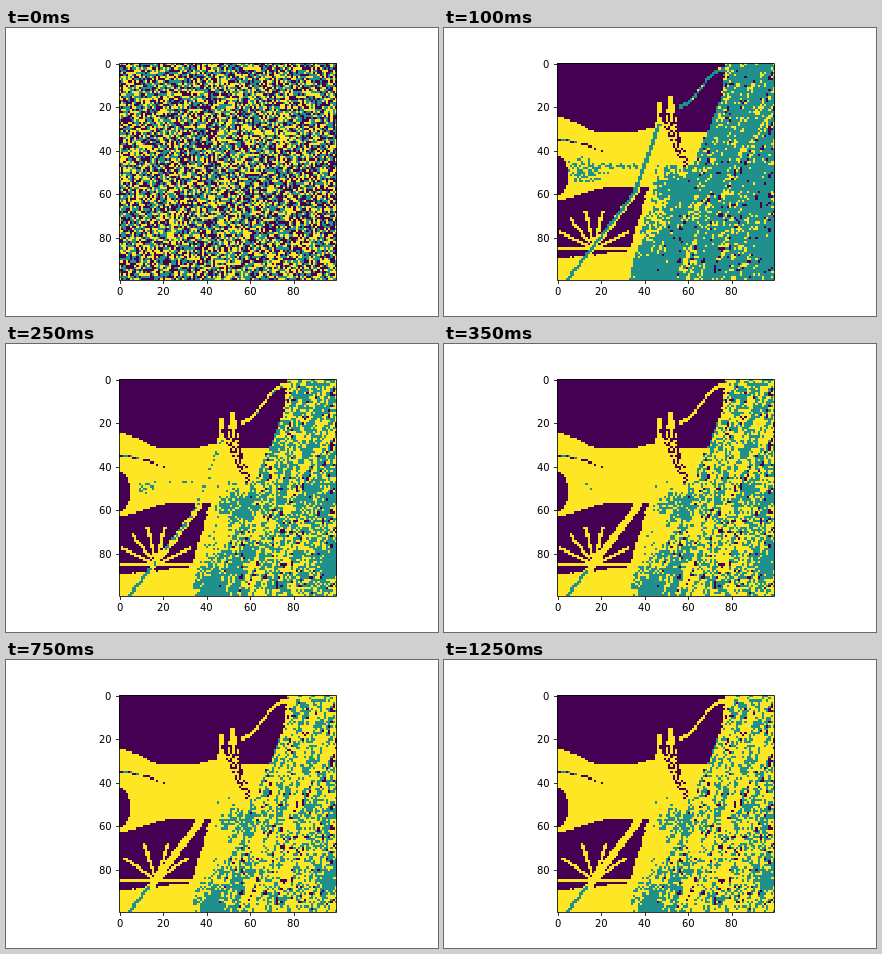
These frames come from a looping animation (432 px wide and 288 px high, 1350 ms). An HTML page with a canvas:

```html
<!DOCTYPE html>
<html lang="en">
<head>
<meta charset="utf-8">
<title>Three-class segmentation</title>
<style>
  html, body { margin: 0; width: 100%; height: 100%; overflow: hidden; background: #fff; }
  canvas, svg { position: absolute; left: 0; top: 0; width: 432px; height: 288px; }
  text { font: 10px "DejaVu Sans", sans-serif; }
</style>
</head>
<body>
<canvas id="plot" width="432" height="288"></canvas>
<svg id="axes" viewBox="0 0 432 288"></svg>
<script>
const N = 100, STEP = 50, LOOP = 1350;
const COLORS = [[68, 1, 84], [32, 144, 140], [253, 231, 37]];
const PURPLE = 0, TEAL = 1, YELLOW = 2;

// --- noise and easing ---
function hash(x, y, seed = 0) {
  let h = Math.imul(x + 311, 374761393) ^ Math.imul(y + 97, 668265263) ^ Math.imul(seed + 7, 1274126177);
  h = Math.imul(h ^ (h >>> 15), 2246822519);
  h = Math.imul(h ^ (h >>> 13), 3266489917);
  return ((h ^ (h >>> 16)) >>> 0) / 4294967296;
}
const mix = (a, b, t) => a + (b - a) * t;
const ease = t => { t = Math.max(0, Math.min(1, t)); return t * t * (3 - 2 * t); };
const bump = (dx, dy, r) => Math.exp(-(dx * dx + dy * dy) / (r * r));

function smooth(x, y, seed) {
  const i = Math.floor(x), j = Math.floor(y), u = x - i, v = y - j;
  return mix(mix(hash(i, j, seed), hash(i + 1, j, seed), u),
             mix(hash(i, j + 1, seed), hash(i + 1, j + 1, seed), u), v);
}
// Grain drawn out along a slanted direction, spread over about 0..1.
function streak(x, y, slope, seed) {
  const s = 0.55 * smooth((x + slope * y) / 1.3, y / 5, seed) + 0.45 * hash(x, y, seed + 1);
  return 0.5 + (s - 0.5) * 1.6;
}

// --- outlines, in cells ---
const skyBottom = x => 25 + 7.3 * ease(x / 22) - 2.5 * bump(x - 46, 0, 9);
const skyRight = y => 77 - 8.5 * (y / 32) ** 2;
const blade = x => 20 - 17 * ease((x - 56) / 20);
const stem = y => 36 - (y < 60 ? 0.36 : 0.77) * (y - 60);
const wheelTop = x => 63 - 6 * ease(x / 25);
const wheelRight = y => 42 - 0.3 * (y - 57);
const wheelBottom = x => 90.5 - 0.13 * x;
const grainEdge = y => y < 33 ? skyRight(y) : 68 - 0.4 * (y - 33);
const grainLimit = y => 46 - 0.25 * (y - 48);
const HUB = { x: 17, y: 85.5 };

const inEars = (x, y) =>
  (y > 18 && y < 34 && Math.abs(x - 47) < (y > 27 ? 1.8 : 1)) ||
  (y > 15 && y < 34 && Math.abs(x - 52.2) < 0.7 + 0.16 * (y - 15));

const inFlecks = (x, y) =>
  y > 23 && y < 48 && Math.abs(x - 50.5 - 0.36 * (y - 24)) < 3.5 - 0.07 * (y - 24);

// Teal score of the grainy right side; clumps pull it down, the sparse foot pushes it up.
function grain(col, row, x, y) {
  const left = Math.max(0, grainEdge(y) - x);
  return streak(col, row, 0.38, 10) + (left ? 0.18 + 0.012 * left : 0)
    - 0.35 * bump(x - 54, y - 57, 7)
    - 0.6 * bump(x - 42, y - 98, 8)
    - 0.4 * bump(x - 96, y - 85, 6)
    + 0.12 * bump(x - 76, y - 89, 15);
}

// Teal score of the pale band on the left.
function band(col, row, x, y) {
  const blob = bump((x - 13) / 1.5, y - 50, 5);
  const strip = x > 14 && x < 37 ? 0.8 * bump(0, y - 47.5, 1.5) : 0;
  return 0.85 + 0.5 * hash(col, row, 6) - 0.45 * Math.max(blob, strip);
}

// Everything about a cell that does not depend on the step.
function survey(col, row) {
  const x = col + 0.5, y = row + 0.5;
  const jx = x + (hash(col, row, 3) - 0.5) * 0.6, jy = y + (hash(col, row, 4) - 0.5) * 0.6;
  const right = jy < 33 ? jx > skyRight(jy) : jx > grainEdge(jy) || (jy > 47 && jx > grainLimit(jy));
  const c = { dark: false, wheel: false, fleck: 0, score: 2, off: x - stem(y) };

  c.score = right ? grain(col, row, x, y) : band(col, row, x, y);
  if (x > grainEdge(y)) c.fleck = streak(col, row, 0.38, 30);

  if (jy < skyBottom(jx) && jx < skyRight(jy) && !inEars(x, y)) c.dark = true;
  if (inFlecks(x, y) && streak(col, row, -0.4, 20) > 0.5) c.dark = true;
  if (Math.hypot(jx / 5, (jy - 52) / 9) < 1) c.dark = true;
  if (jy > wheelTop(jx) && jy < wheelBottom(jx) && jx < wheelRight(jy)) c.dark = c.wheel = true;

  // grass blade across the sky
  if (x > 56 && x < 77 && Math.abs(y - blade(x)) < 1.1) {
    c.dark = false;
    c.score = 0.5 + 0.4 * hash(col, row, 9);
  }
  // stem, teal along its left side
  if (y > 28 && Math.abs(c.off + 0.5) < 0.9) c.score = y > 88 ? 0.1 : 0.5 + 0.2 * hash(col, row, 5);
  // dashed arc over the pale band
  if (x < 24 && Math.abs(y - 35.6 - 0.0125 * x * x) < 0.5) {
    c.dark = hash(col, 1, 8) > 0.5;
    if (x < 9) c.score = 0.2;
  }
  return c;
}

const cells = Array.from({ length: N * N }, (_, i) => survey(i % N, Math.floor(i / N)));

// Pale spokes fanned out above the hub.
function onSpoke(i, k) {
  const dx = i % N + 0.5 - HUB.x, dy = HUB.y - Math.floor(i / N) - 0.5;
  const gap = Math.PI / (k < 9 ? 7 : 5), a = Math.atan2(dy, dx) / gap, r = Math.hypot(dx, dy);
  return dy > -1 && r < 18 && Math.abs(a - Math.round(a)) * gap * r < 0.7;
}

function classOf(i, k) {
  if (k === 0) return Math.floor(hash(i % N, Math.floor(i / N), 50) * 3);
  if (k === 1) return PURPLE;
  const c = cells[i], limit = 0.43 + 0.27 * Math.exp((3 - k) / 3) - 0.0008 * k;
  const opened = c.wheel && (Math.abs(c.off) < (k < 6 ? 1.5 : 2) || onSpoke(i, k));
  if (c.dark && !opened || c.fleck > 0.92) return PURPLE;
  return c.score < limit ? TEAL : YELLOW;
}

// --- drawing ---
const ctx = document.getElementById("plot").getContext("2d");
const grid = document.createElement("canvas");
grid.width = grid.height = N;
const gctx = grid.getContext("2d"), img = gctx.createImageData(N, N);

function draw(k) {
  for (let i = 0; i < N * N; i++) {
    img.data.set(COLORS[classOf(i, k)], i * 4);
    img.data[i * 4 + 3] = 255;
  }
  gctx.putImageData(img, 0, 0);
  ctx.imageSmoothingEnabled = false;
  ctx.drawImage(grid, 113, 35, 218, 217);
}

function drawAxes() {
  const snap = v => Math.floor(v + 0.5) + 0.5;
  const label = (x, y, n) => `<text x="${Math.round(x)}" y="${Math.round(y)}">${n}</text>`;
  let lines = "M113.5 35.5H330.5V252.5H113.5Z", labels = "";
  for (let n = 0; n < N; n += 20) {
    const at = (n + 0.5) * 2.1744, x = 112.68 + at, y = 34.56 + at;
    const width = 6.36 * String(n).length;
    lines += `M${snap(x)} 252.5v3.5M113.5 ${snap(y)}h-3.5`;
    labels += label(x - width / 2, 267, n) + label(105.7 - width, y + 4, n);
  }
  document.getElementById("axes").innerHTML =
    `<path d="${lines}" fill="none" stroke="#000" stroke-width=".8"/>${labels}`;
}

let shown = -1;
function tick() {
  const k = Math.min(25, Math.floor(performance.now() % LOOP / STEP));
  if (k !== shown) draw(shown = k);
  requestAnimationFrame(tick);
}
drawAxes();
tick();
</script>
</body>
</html>
```
